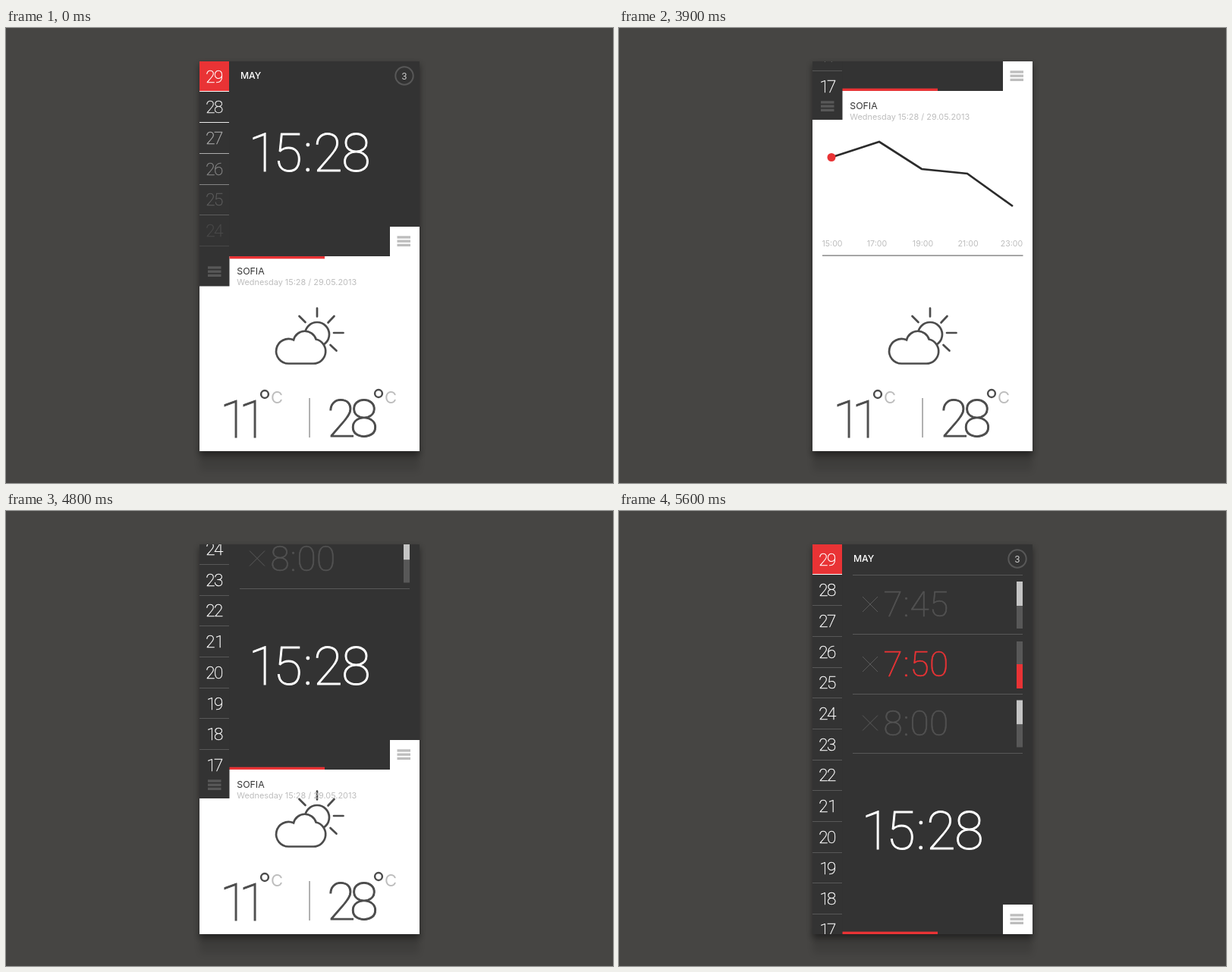
Write an HTML page that moves like this. It is 800 px wide and 600 px high and loops after 8000 ms.

```html
<!DOCTYPE html>
<html lang="en">
<head>
<meta charset="utf-8">
<title>Weather and alarm card</title>
<style>
  html, body { margin: 0; width: 100%; height: 100%; overflow: hidden; background: #464543; }
  svg { display: block; width: 800px; height: 600px; }
  .num { font-family: Roboto, sans-serif; font-weight: 100; font-stretch: 87.5%; text-anchor: middle; }
  .label { font-family: Inter, "Liberation Sans", sans-serif; }
</style>
</head>
<body>
<svg id="stage" viewBox="0 0 800 600" xmlns="http://www.w3.org/2000/svg"></svg>
<script>
const RED = '#e93335', DARK = '#333', INK = '#4c4c4c', PALE = '#bdbdbd', RULE = '#585858';
const LOOP = 8000, STEP = 100;

const rect = (x, y, w, h, fill, more = '') =>
  `<rect x="${x}" y="${y}" width="${w}" height="${h}" fill="${fill}" ${more}/>`;

const label = (text, x, y, size, fill, more = '') =>
  `<text class="label" x="${x}" y="${y}" font-size="${size}" fill="${fill}" ${more}>${text}</text>`;

// Thin figures set on a regular pitch; x is the centre of the first one.
function figures(text, x, y, size, fill, pitch, colon = 0, more = '') {
  const xs = [];
  let at = x;
  [...text].forEach((c, i) => {
    if (i) at += c === ':' || text[i - 1] === ':' ? colon : pitch;
    xs.push((at + (c === '1' ? size * 0.06 : 0)).toFixed(1));
  });
  return `<text class="num" x="${xs.join(' ')}" y="${y}" font-size="${size}" fill="${fill}"
    stroke="${fill}" stroke-width="${size > 60 ? 1.1 : size > 30 ? 0.7 : 0.4}" ${more}>${text}</text>`;
}

const menu = (x, y, fill) =>
  [-6.7, -1.5, 3.7].map(dy => rect(x, y + dy, 17.5, 3.3, fill)).join('');

const badge = (y, ring, ink) =>
  `<circle cx="525" cy="${y}" r="11.7" fill="none" stroke="${ring}" stroke-width="2"/>
   <text x="525" y="${y + 4.5}" font-family="Roboto, sans-serif" font-size="12.5"
     text-anchor="middle" fill="${ink}">3</text>`;

function chart() {
  const hours = [281, 340, 400.5, 460, 517.5];
  return `<polyline points="280,170.5 343,150 399,186 459,192 519,235" fill="none"
      stroke="#2b2b2b" stroke-width="2.7"/>
    <circle cx="280" cy="170.5" r="5.5" fill="${RED}"/>` +
    hours.map((x, i) => label(15 + 2 * i + ':00', x, 288, 10.6, PALE, 'text-anchor="middle"')).join('') +
    rect(268, 299.4, 264.5, 1.3, '#777');
}

function weather() {
  const degree = (x, y) =>
    `<circle cx="${x}" cy="${y}" r="4.9" fill="none" stroke="${INK}" stroke-width="2.5"/>` +
    label('C', x + 8, 495, 22, PALE);
  return `<g fill="#fff" stroke="${INK}" stroke-width="2.7" stroke-linecap="round">
      <circle cx="410" cy="404" r="16"/>
      <path d="M410 369.5V380.5M424.5 388.5L432.5 380M432 402H444.5M427.5 418L435.5 425.5M394.5 388L386.5 380"/>
      <path d="M372.5 442.5A16.3 16.3 0 1 1 379 411.3A15.4 15.4 0 0 1 408.6 410.5A16.2 16.2 0 0 1 405 442.5Z"/>
    </g>` +
    figures('11', 296.5, 539.5, 69, INK, 25) + degree(341, 483) +
    rect(399.4, 488, 1.3, 52, '#888') +
    figures('28', 442, 539, 69, INK, 30) + degree(491, 482);
}

// Day column; top is the upper edge of the red cell.
function days(top, count, fade) {
  let out = rect(255, top, 39, 39, RED);
  for (let i = 0; i < count; i++) {
    const a = fade ? [1, 0.9, 0.6, 0.4, 0.2, 0.1][i] : 1;
    const y = top + 40.7 * i;
    const line = fade || !i ? '#fff' : RULE;
    out += figures(String(29 - i), 269.3, y + 27.5, 22.5, '#fff', 10.8, 0, `opacity="${a}"`);
    if (i < 12) out += rect(255, Math.round(y + 39.4), 39, 1, line, `opacity="${a}"`);
  }
  return out;
}

function alarm(time, y, on) {
  const [first, second] = on ? [RULE, RED] : ['#c4c4c4', RULE];
  const split = on ? 30 : 32;
  return `<path d="M321 ${y - 10}l20 20m0-20l-20 20" stroke="#5a5a5a" stroke-width="1"/>` +
    figures(time, 361, y + 16, 46, on ? RED : '#525252', 25.7, 17.5) +
    rect(524, y - 30, 8, split, first) + rect(524, y - 30 + split, 8, 62 - split, second);
}

// Sliding panel, drawn with its lower edge at y = 0.
function panel(tall) {
  const top = tall ? -514 : -257;
  const height = 10 - top;
  let out = rect(294, top - 10, 251, height, DARK) +
    rect(255, top - 10, 39.5, height + (tall ? 38 : 39.5), DARK) +
    days(top, tall ? 13 : 6, !tall) +
    label('MAY', 309, top + 23, 12.2, '#fff', 'font-weight="500"') +
    badge(top + 19, RULE, '#ccc') +
    figures('15:28', 334.5, -112, 70, '#fff', 37, 26.5);
  if (tall) {
    for (let i = 0; i < 4; i++) out += rect(308, Math.round(top + 40 + 78.4 * i), 224, 1, RULE);
    out += alarm('7:45', top + 79, false) + alarm('7:50', top + 158, true) +
      alarm('8:00', top + 235.5, false);
  }
  return out + rect(506, -39, 39, 39, '#fff') + menu(515.5, -20, PALE) +
    menu(266, 20, '#585858') +
    rect(294.5, tall ? -3.3 : 0, 125.5, 3.3, RED) +
    label('SOFIA', 304.3, 24.3, 12.3, '#333') +
    label('Wednesday 15:28 / 29.05.2013', 304.3, 37.8, 10.9, PALE);
}

document.getElementById('stage').innerHTML = `
  <defs>
    <clipPath id="card"><rect x="255" y="44" width="290" height="514"/></clipPath>
    <filter id="soft" x="-20%" y="-20%" width="140%" height="140%"><feGaussianBlur stdDeviation="4"/></filter>
    <linearGradient id="fall" x1="0" y1="0" x2="0" y2="1">
      <stop offset="0" stop-color="#000" stop-opacity=".2"/>
      <stop offset="1" stop-color="#000" stop-opacity=".06"/>
    </linearGradient>
  </defs>
  ${rect(0, 0, 800, 600, '#464543')}
  ${rect(255, 556, 290, 30, 'url(#fall)', 'filter="url(#soft)"')}
  ${rect(255, 48, 290, 514, '#000', 'opacity=".45" filter="url(#soft)"')}
  <g clip-path="url(#card)">
    ${rect(255, 44, 290, 514, '#fff')}
    ${badge(63, PALE, '#555')}${chart()}${weather()}
    <g id="short">${panel(false)}</g>
    <g id="tall">${panel(true)}</g>
  </g>`;

const short = document.getElementById('short');
const tall = document.getElementById('tall');

function edgeAt(t) {
  const steps = from => Math.floor((t - from) / STEP);
  if (t < 3900) return 301 - 258 * Math.min(9, steps(0)) / 9;
  if (t < 4800) {
    const n = steps(3900);
    return n < 4 ? 83 + 26 * n : 187 + 28.5 * (n - 4);
  }
  return 341 + 217 * Math.min(8, steps(4800)) / 8;
}

function draw(t) {
  const open = t >= 3900;
  short.setAttribute('display', open ? 'none' : 'inline');
  tall.setAttribute('display', open ? 'inline' : 'none');
  (open ? tall : short).setAttribute('transform', `translate(0 ${Math.floor(edgeAt(t))})`);
}

let start;
function tick(now) {
  start ??= now;
  draw((now - start) % LOOP);
  requestAnimationFrame(tick);
}
draw(0);
requestAnimationFrame(tick);
</script>
</body>
</html>
```
